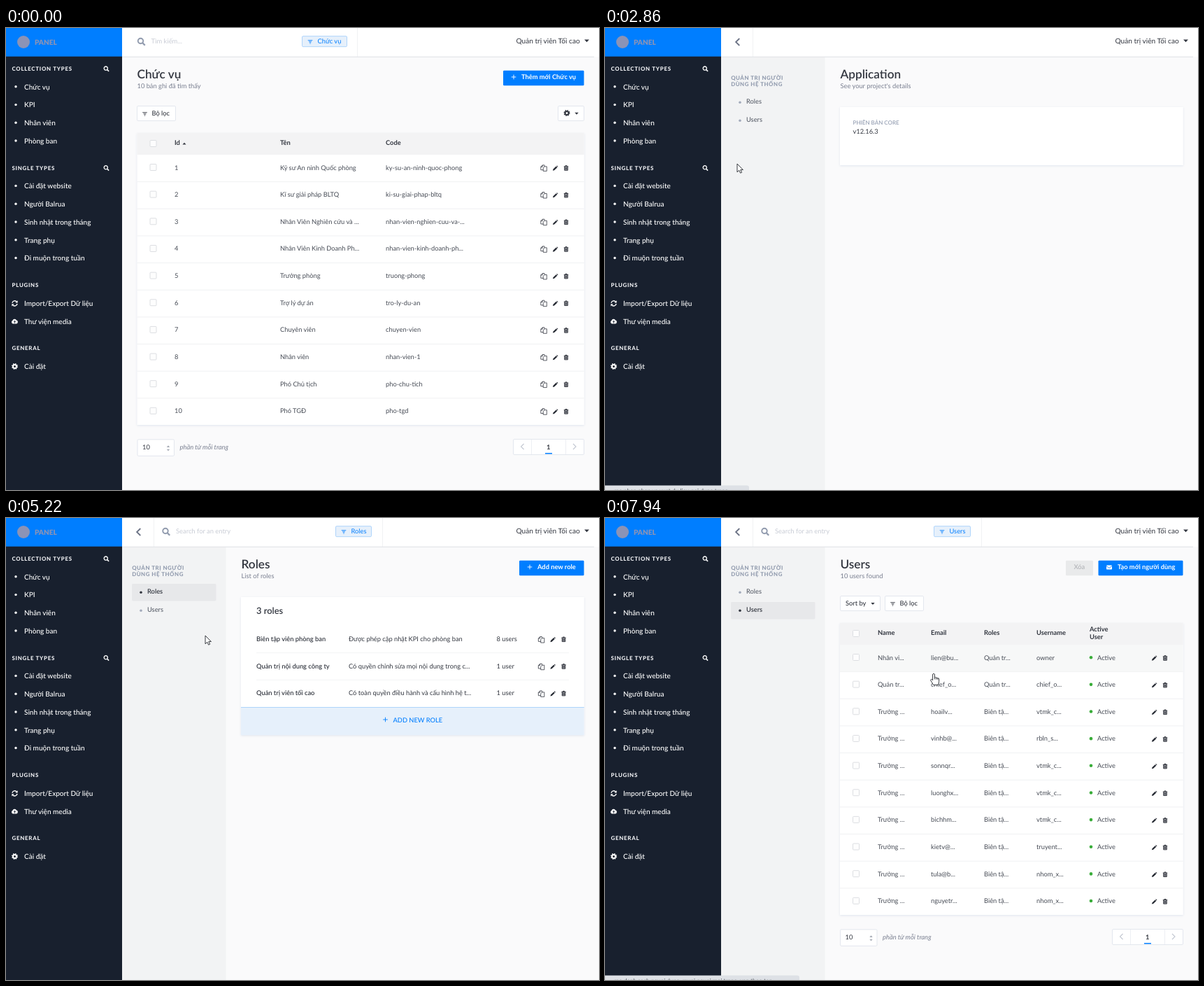
Animation of 848x660 px, one loop 8000 ms. Source, as an HTML page:

```html
<!DOCTYPE html>
<html lang="vi">
<head>
<meta charset="utf-8">
<title>Bảng quản trị</title>
<style>
html, body { margin: 0; width: 100%; height: 100%; overflow: hidden; background: #fafafb; }
svg { display: block; width: 848px; height: 660px; }
text { font-family: Lato, "Noto Sans", sans-serif; text-rendering: geometricPrecision; white-space: pre; }
.card { filter: drop-shadow(0 1.4px 1.4px #e0e5ee); }
</style>
</head>
<body>
<svg id="stage" viewBox="0 0 848 660" xmlns="http://www.w3.org/2000/svg"></svg>
<script>
const LOOP = 8000, ROW = 38.65, FIRST = 199.5;
const DARK = '#333740', GREY = '#787e8f', PALE = '#919bae', BLUE = '#007eff', LINE = '#e3e7ee';

// Drawing helpers
const text = (x, y, s, fill = DARK, size = 9.3, weight = 400, more = '') =>
  `<text x="${x}" y="${y}" fill="${fill}" font-size="${size}" font-weight="${weight}" ${more}>${s}</text>`;
const rect = (x, y, w, h, fill, more = '') =>
  `<rect x="${x}" y="${y}" width="${w}" height="${h}" fill="${fill}" ${more}/>`;
const box = (x, y, w, h, fill = '#fff', stroke = LINE) =>
  rect(x + .5, y + .5, w - 1, h - 1, fill, `stroke="${stroke}" rx="1.4"`);
const dot = (x, y, r, fill) => `<circle cx="${x}" cy="${y}" r="${r}" fill="${fill}"/>`;
const path = (d, x, y, color, width = 1, fill = 'none') =>
  `<path transform="translate(${x} ${y})" d="${d}" fill="${fill}" stroke="${color}" stroke-width="${width}"/>`;
const shape = (d, x, y, fill) => path(d, x, y, 'none', 0, fill);

// Icons, centred on x, y
const lens = (x, y, k, color) =>
  `<g transform="translate(${x} ${y}) scale(${k})" fill="none" stroke="${color}"><circle cx="-.7" cy="-.7" r="2.6" stroke-width="1.3"/><path d="M1.2 1.2L3.6 3.6" stroke-width="1.6"/></g>`;
const gear = (x, y, color) =>
  `<g fill="none" stroke="${color}"><circle cx="${x}" cy="${y}" r="2.5" stroke-width="2"/><circle cx="${x}" cy="${y}" r="3.8" stroke-width="1.4" stroke-dasharray="1.6 1.385"/></g>`;
const caret = (x, y, color = DARK, k = 1) => shape(`M${-3 * k} ${-1.5 * k}H${3 * k}L0 ${1.8 * k}Z`, x, y, color);
const funnel = (x, y, color) => path('M-3.3 -2H3.3M-2.1 -.4H2.1M-1.2 1.2H1.2M-.5 2.7H.5', x, y, color, .8);
const plus = (x, y, color) => path('M-3.3 0H3.3M0 -3.3V3.3', x, y, color, .9);
const copy = (x, y) => path('M-4.2 -1.8L-1.8 -4.2H1V-2M-4.2 -1.8V2.6H-.6M-4.2 -1.8H-1.8V-4.2M-.8 -.2L1.2 -2.2H4.3V4.3H-.8Z', x, y, DARK, .8);
const pencil = (x, y) => shape('M-3.6 3.4L-3 1.3 1.2 -2.7 2.8 -1.1 -1.4 2.9ZM1.7 -3.2L2.5 -3.8 3.9 -2.4 3.3 -1.6Z', x, y, '#252932');
const bin = (x, y) =>
  path('M-3.2 -2.3H3.2M-1.1 -2.5V-3.4H1.1V-2.5M-2.3 -2.1V3.2H2.3V-2.1M-.8 -1V2.2M.8 -1V2.2', x, y, '#252932', .9, '#a9abb0');
const check = (x, y) => rect(x - 4.5, y - 4.5, 9, 9, '#fdfdfd', 'stroke="#dcdee2" rx="1"');
const ring = (id, x, y, r, width, color) =>
  `<circle cx="${x}" cy="${y}" r="${r}" fill="none" stroke="#f0f0f1" stroke-width="${width}"/>
   <path id="${id}" d="M${x - r * .707} ${y - r * .707}A${r} ${r} 0 0 1 ${x + r * .707} ${y - r * .707}" fill="none" stroke="${color}" stroke-width="${width}"/>`;

// Sidebar
const links = [
  ['Chức vụ', 84], ['KPI', 109.8], ['Nhân viên', 135.5], ['Phòng ban', 161.2],
  ['Cài đặt website', 225.6], ['Người Balrua', 251.4], ['Sinh nhật trong tháng', 277.2], ['Trang phụ', 303], ['Đi muộn trong tuần', 328.7],
  ['Import/Export Dữ liệu', 393.2], ['Thư viện media', 419], ['Cài đặt', 483.2]
];

function linkIcon(i, y) {
  if (i < 9) return dot(14, y - .4, 1.7, '#fff');
  if (i === 9) return path('M-3.6 -.6A3.7 3.7 0 0 1 2.8 -2.4M3.6 .6A3.7 3.7 0 0 1 -2.8 2.4', 12.5, y, '#fff', 1.4) +
    shape('M4.2 -4.2V-.8H.8ZM-4.2 4.2V.8H-.8Z', 12.5, y, '#fff');
  if (i === 10) return shape('M-2.6 3.2A2.4 2.4 0 0 1 -3 -1.4A2.9 2.9 0 0 1 2.2 -2A2.7 2.7 0 0 1 2.6 3.2Z', 12.5, y, '#fff') +
    path('M0 2.4V-.8M-1.4 .5L0 -1 1.4 .5', 12.5, y, '#18202e', .9);
  return gear(12.5, y, '#fff');
}

function sidebar() {
  const head = (y, s) => text(8.5, y + 2.9, s, '#f4f5f8', 7.9, 800, 'letter-spacing=".74"');
  return rect(0, 0, 166, 660, '#18202e') + rect(0, 0, 166, 40.7, BLUE) +
    dot(25, 20, 9, '#8b93b6') + text(41, 23.6, 'PANEL', '#8b93b6', 10, 900) +
    head(58, 'COLLECTION TYPES') + head(199.6, 'SINGLE TYPES') + head(367, 'PLUGINS') + head(457.2, 'GENERAL') +
    lens(143.5, 58.3, 1, '#fff') + lens(143.5, 200, 1, '#fff') +
    rect(0, 0, 148, 26, '#f0b41f', 'id="hover"') +
    links.map(([s, y], i) => linkIcon(i, y + .2) + text(26, y + 3.5, s, '#fff', 10.05, 500)).join('');
}

// Shared page parts
const title = (x, s, sub) => text(x, 72.3, s, DARK, 17.2, 600) + text(x, 86, sub, GREY);

function search(x, hint, bx, bw, tag, edge) {
  return lens(x, 19.5, 1.45, PALE) + text(x + 14, 22.3, hint, '#c8ccd5', 9.4) +
    box(bx, 11.2, bw, 16, '#e6f0fb', '#aed4fb') + funnel(bx + 12, 19.6, BLUE) + text(bx + 22.5, 22, tag, BLUE, 9.3) +
    rect(edge, 0, 1, 41, '#f1f2f4');
}

function subnav(active) {
  const item = (s, y, on) => (on ? rect(180, y - 11, 120.5, 24.5, '#e7e8ea', 'rx="1.4"') : '') +
    dot(193, y + 1.2, 1.8, on ? DARK : '#a3abbb') + text(202, y + 3.2, s, on ? DARK : '#4c525e', 9.3, on ? 600 : 400);
  const head = (y, s) => text(180.2, y, s, PALE, 7.9, 800, 'letter-spacing=".52"');
  return rect(166, 41, 148.5, 619, '#f2f3f4') + rect(211, 0, 1, 41, '#f1f2f4') +
    path('M2.8 -5L-2.4 0 2.8 5', 189.5, 20, '#6c7386', 1.8) +
    head(74, 'QUẢN TRỊ NGƯỜI') + head(83, 'DÙNG HỆ THỐNG') +
    item('Roles', 105, active === 0) + item('Users', 131, active === 1);
}

const button = (x, s, tx, icon) => rect(x, 60.8, 826.5 - x, 21.5, BLUE, 'rx="1.4"') + icon + text(tx, 73.4, s, '#fff', 9.3, 700);
const filter = x => box(x, 111, 56, 22) + funnel(x + 11.5, 122.6, DARK) + text(x + 21.5, 125, 'Bộ lọc', DARK, 9.3, 500);

function table(x, hover = '') {
  const w = 826.7 - x;
  let s = `<g class="card">${rect(x, 150, w, 417, '#fff')}</g>` + rect(x, 150, w, 31, '#f3f3f4') + hover + check(x + 23, 165);
  for (let i = 0; i < 10; i++) {
    const y = FIRST + i * ROW;
    if (i) s += rect(x, y - 19, w, 1, '#f0f1f3');
    s += check(x + 23, y - .5) + pencil(785.5, y + .8) + bin(801, y + .6);
  }
  return s;
}

const column = (x, head, cells, color = '#454a54') =>
  (head ? text(x, 167.2, head, DARK, 9.3, 700) : '') +
  cells.map((s, i) => text(x, (FIRST + 3 + i * ROW).toFixed(1), s, color)).join('');

const pager = x => box(x, 587.4, 53.5, 24.4) + text(x + 7.5, 602, '10') +
  shape('M-2.2 -1.4H2.2L0 -4ZM-2.2 1.4H2.2L0 4Z', x + 44.5, 600.3, '#a4a9b3') +
  text(x + 61, 602, 'phần tử mỗi trang', GREY, 9.35, 400, 'font-style="italic"') +
  box(725, 587, 102, 23) + rect(751, 588, 1, 21, '#eceff3') + rect(800, 588, 1, 21, '#eceff3') +
  path('M2 -4L-2 0 2 4', 738.5, 598, '#c3c8d2', 1.1) + path('M-2 -4L2 0 -2 4', 813, 598, '#c3c8d2', 1.1) +
  text(773, 602.4, '1', DARK, 9.3, 700) + rect(771, 607, 10, 1.5, BLUE);

// Pages
function listPage() {
  const names = ['Kỹ sư An ninh Quốc phòng', 'Kĩ sư giải pháp BLTQ', 'Nhân Viên Nghiên cứu và ...', 'Nhân Viên Kinh Doanh Ph...',
    'Trưởng phòng', 'Trợ lý dự án', 'Chuyên viên', 'Nhân viên', 'Phó Chủ tịch', 'Phó TGĐ'];
  const codes = ['ky-su-an-ninh-quoc-phong', 'ki-su-giai-phap-bltq', 'nhan-vien-nghien-cuu-va-...', 'nhan-vien-kinh-doanh-ph...',
    'truong-phong', 'tro-ly-du-an', 'chuyen-vien', 'nhan-vien-1', 'pho-chu-tich', 'pho-tgd'];
  return search(193.5, 'Tìm kiếm...', 423, 65, 'Chức vụ', 502) + title(187.5, 'Chức vụ', '10 bản ghi đã tìm thấy') +
    button(711, 'Thêm mới Chức vụ', 737, plus(726, 70, '#fff')) + filter(187) +
    box(789, 111, 38, 22) + gear(802, 121.5, DARK) + caret(816, 122.2, DARK, .9) + table(187.5) +
    column(241, 'Id', names.map((_, i) => i + 1)) + caret(255, 165.2, DARK, -.85) +
    column(392, 'Tên', names) + column(543, 'Code', codes) +
    names.map((_, i) => copy(769, FIRST + .6 + i * ROW)).join('') + pager(187.5);
}

function appPage() {
  return subnav() + title(336.5, 'Application', 'See your project\'s details') +
    `<g class="card">${rect(336, 113, 490.7, 83, '#fff')}</g>` +
    text(354.5, 138, 'PHIÊN BẢN CORE', '#98a2b5', 8, 600) + text(354.5, 151, 'v12.16.3');
}

function rolesPage(ready) {
  const end = ready ? 270 : 216, w = 490.7;
  const rows = [
    ['Biên tập viên phòng ban', 'Được phép cập nhật KPI cho phòng ban', '8 users'],
    ['Quản trị nội dung công ty', 'Có quyền chỉnh sửa mọi nội dung trong c...', '1 user'],
    ['Quản trị viên tối cao', 'Có toàn quyền điều hành và cấu hình hệ t...', '1 user']
  ];
  const list = rows.map(([a, b, c], i) => {
    const y = 173 + i * ROW;
    return (i ? rect(358, y - 19.5, 447, 1, '#f3f4f5') : '') + text(358, y + 3, a, DARK, 9.3, 600) + text(490, y + 3, b) +
      text(701.5, y + 3, c) + copy(765.5, y + .8) + pencil(782, y + .8) + bin(797.5, y + .4);
  }).join('');
  return subnav(0) + search(229, 'Search for an entry', 471, 52, 'Roles', 538) +
    title(336.5, 'Roles', ready ? 'List of roles' : '') + (ready ? '' : rect(336.5, 85, 47.5, 4, '#f0f0f1', 'rx="1"')) +
    button(734, 'Add new role', 760, plus(749, 70, '#fff')) +
    `<g class="card">${rect(336, 113, w, end - 73, '#fff')}</g>` + rect(336, end, w, 40, '#e6f0fb') + rect(336, end, w, 1, '#aed4fb') +
    text(358, 137.2, ready ? '3 roles' : '0 role', DARK, 12.9, 600) + (ready ? list : ring('spinS', 582, 185, 8, 2.4, '#555a63')) +
    plus(542.5, end + 18, BLUE) + text(553.5, end + 21.7, 'ADD NEW ROLE', BLUE, 9.3, 500);
}

function usersPage(ready) {
  if (!ready) return subnav(1) + ring('spinL', 582, 389, 16, 4, '#2b86dd') +
    rect(841, 0, 7, 660, '#f1f1f1') + rect(842, 0, 6, 616, '#c6c6c7');
  const people = ['Nhân vi...', 'Quản tr...', ...Array(8).fill('Trưởng ...')];
  const roles = ['Quản tr...', 'Quản tr...', ...Array(8).fill('Biên tậ...')];
  const mails = ['lien@bu...', 'chief_o...', 'hoailv...', 'vinhb@...', 'sonnqr...', 'luonghx...', 'bichhm...', 'kietv@...', 'tula@b...', 'nguyetr...'];
  const logins = ['owner', 'chief_o...', 'vtmk_c...', 'rbln_s...', 'vtmk_c...', 'vtmk_c...', 'vtmk_c...', 'truyent...', 'nhom_x...', 'nhom_x...'];
  return subnav(1) + search(229, 'Search for an entry', 470, 53, 'Users', 538) + title(336.5, 'Users', '10 users found') +
    rect(659, 60.8, 39, 21.5, '#e9eaeb', 'rx="1.4"') + text(670.5, 73.4, 'Xóa', '#b4b6ba', 9.3, 600) +
    button(705.5, 'Tạo mới người dùng', 733, rect(717, 67.5, 8, 6, '#fff', 'rx=".8"') + path('M-4 -2L0 1 4 -2', 721, 70.5, BLUE, .8)) +
    box(336, 111, 58, 22) + text(344, 125, 'Sort by', DARK, 9.3, 500) + caret(383, 122.4, DARK, .9) + filter(400) +
    table(336, rect(336, 181, 490.7, 38, '#f7f8f8', 'id="rowHover"')) +
    column(390, 'Name', people) + column(466, 'Email', mails) + column(542, 'Roles', roles) + column(617, 'Username', logins) +
    text(693, 161.6, 'Active', DARK, 9.3, 700) + text(693, 173.2, 'User', DARK, 9.3, 700) +
    column(704, '', people.map(() => 'Active')) + people.map((_, i) => dot(695, FIRST - .3 + i * ROW, 2.3, '#3aad3a')).join('') +
    pager(336);
}

// [start, page]
const scenes = [[0, listPage()], [1390, appPage()], [3480, rolesPage(false)], [4090, rolesPage(true)], [7000, usersPage(false)], [7200, usersPage(true)]];

// Pointer moves: [first step, last step, steps, x, y]
const origin = [421, 612];
const moves = [
  [500, 1180, 10, 55, 479], [2590, 2860, 5, 189, 194], [2930, 3340, 7, 204, 112], [3410, 3480, 2, 206, 108],
  [4030, 4150, 3, 229, 136], [4220, 4220, 1, 230, 146], [4420, 4490, 2, 252, 150], [4560, 4690, 3, 206, 149],
  [5220, 5220, 1, 285, 168], [5290, 5980, 11, 792, 214], [6180, 6870, 11, 217, 132], [7730, 7940, 4, 470, 222]
];

// Link hints: [from, to, width, text]
const hints = [
  [1100, 2660, 278, 'mo trang cai dat he thong'], [2660, 2990, 206, 'mo phan nhap va xuat du lieu noi dung trang'],
  [3270, 4420, 140, 'mo danh sach vai tro he thong'], [6800, LOOP, 278, 'mo danh sach nguoi dung, muoi nguoi moi trang, xep theo ten']
];

const arrow = 'M0 0V11.8L2.8 9.3 4.6 13.2 6.6 12.3 4.8 8.6H8.4Z';
const hand = 'M-1.4 1.2Q0 -.6 1.4 1.2V5.8Q2.7 4.9 3.6 6.2Q5 5.6 5.7 6.9Q7.4 6.4 7.6 8V11.4Q7.4 14 6.3 16.4H-.6Q-2 13.2 -4 10.6Q-4.8 8.7 -3.4 8.3Q-2.4 8.4 -1.4 9.8ZM1.4 5.8V8.4M3.6 6.2V8.6M5.7 6.9V8.8';

document.getElementById('stage').innerHTML =
  rect(0, 0, 848, 660, '#fafafb') + rect(166, 0, 682, 41, '#fff') +
  scenes.map(([, s], i) => `<g id="page${i}">${s}</g>`).join('') + rect(166, 40.7, 675, 1.2, '#e3e5e8') +
  `<g id="user">${text(729.5, 22.3, 'Quản trị viên Tối cao', DARK, 10.15)}${caret(830.5, 18.3, DARK, 1.15)}</g>` + sidebar() +
  `<g id="hint"><path id="hintBox" fill="#dee1e6"/>${text(13, 664.2, '', '#555960', 8.4, 400, 'id="hintText"')}</g>` +
  `<path id="pointer" fill="#fff" stroke="#22252b" stroke-width=".9" stroke-linejoin="round"/>`;

const el = id => document.getElementById(id);
const set = (id, attrs) => { for (const k in attrs) el(id).setAttribute(k, attrs[k]); };
const show = (id, on) => set(id, { display: on ? 'inline' : 'none' });

function pointerAt(t) {
  let [x, y] = origin;
  for (const [a, b, n, tx, ty] of moves) {
    if (t < a) break;
    const step = t >= b ? n : Math.floor((t - a) / (b - a) * (n - 1) + .1) + 1;
    const p = Math.min(1, step / n);
    x += (tx - x) * Math.sin(p * Math.PI / 2);
    y += (ty - y) * p;
  }
  return [x, y];
}

function draw(t) {
  const page = scenes.filter(s => s[0] <= t).length - 1;
  scenes.forEach((_, i) => show('page' + i, i === page));
  set('user', { transform: `translate(${page === 4 ? -6.3 : 0} 0)` });
  set('spinS', { transform: `rotate(${25 + (t - 3960) * .18} 582 185)` });
  set('spinL', { transform: `rotate(${12 + (t - 7070) * .18} 582 389)` });

  const [x, y] = pointerAt(t), seen = t >= 500;
  const link = seen && x < 148 && links.find(l => Math.abs(y - l[1]) < 12.9);
  show('hover', link);
  if (link) set('hover', { y: link[1] - 13 });

  const inNav = page > 0 && x > 180 && x < 300 && y > 94 && y < 144;
  const inRows = x > 336 && x < 827 && (page === 3 && y > 154 && y < 270 || page === 5 && y > 181);
  const row = Math.floor((y - 185) / ROW);
  show('rowHover', page === 5 && inRows && row >= 0);
  set('rowHover', { y: 181 + Math.max(0, row) * ROW });

  show('pointer', seen);
  set('pointer', { d: link || inNav || inRows ? hand : arrow, transform: `translate(${x} ${y})` });

  const hint = hints.find(h => t >= h[0] && t < h[1]);
  show('hint', hint);
  if (hint) {
    set('hintBox', { d: `M0 653.5H${hint[2] - 3}Q${hint[2]} 653.5 ${hint[2]} 656.5V660H0Z` });
    el('hintText').textContent = hint[3];
  }
}

const start = performance.now();
function tick() {
  draw((performance.now() - start) % LOOP);
  requestAnimationFrame(tick);
}
tick();
</script>
</body>
</html>
```
